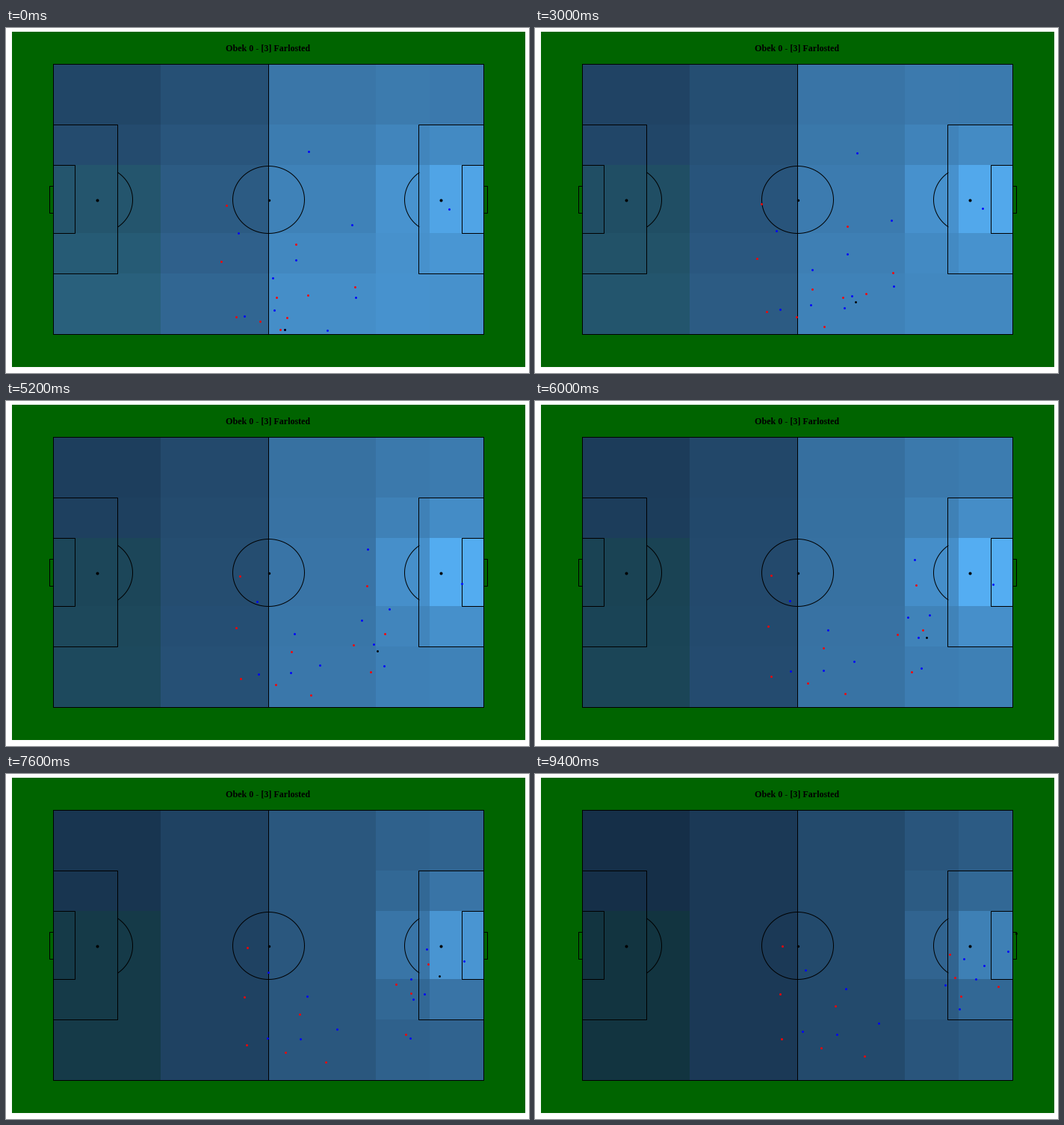
A matplotlib script that plays this animation: 700x461 px, repeating every 10 s.

```python
import numpy as np
import matplotlib.pyplot as plt
from matplotlib.animation import FuncAnimation
from matplotlib.patches import Rectangle

W, H, DPI = 700, 461, 64
FRAMES, STEP = 100, 100
END = 9.4   # seconds of play before the closing hold
TURN = 7.35  # the ball enters the last zone and all values drop
RAMP = 2.2  # seconds the players take to reach full pace

X_EDGES = [63, 207, 351, 495, 567, 639]
Y_EDGES = [48, 129, 183, 274, 328, 409]
LOW, HIGH = np.array([19, 43, 67]), np.array([86, 177, 247])
BOW, TEAL = np.array([1, 4, 5]), np.array([-3, 5, -8])

# Zone value per column: kick-off, before and after the turn, goal
START = np.array([.22, .30, .59, .62, .61])
BEFORE = np.array([.10, .20, .51, .60, .63])
AFTER = np.array([.09, .20, .37, .44, .45])
FINAL = np.array([.03, .12, .25, .34, .38])
ROWS = np.arange(5)
GOAL_PULL = np.outer(np.exp(-(ROWS - 2.0) ** 2), [0, 0, 0, .42, 1])

# Waypoints, evenly spaced over the run
BLUE = [
    [(310, 273), (361, 261)],
    [(356, 333), (415, 286)],
    [(358, 376), (403, 347)],
    [(318, 384), (357, 343)],
    [(404, 164), (448, 176), (528, 221), (632, 236)],
    [(592, 241), (602, 241), (613, 246), (600, 255)],
    [(462, 262), (488, 262), (540, 290), (589, 273)],
    [(387, 309), (438, 298), (516, 283), (573, 246)],
    [(467, 359), (488, 346), (525, 357), (567, 313)],
    [(372, 402), (450, 342), (527, 309), (548, 281)],
    [(429, 403), (413, 363), (432, 344), (459, 332)],
]
RED = [
    [(294, 236), (330, 229)],
    [(361, 359), (401, 309)],
    [(339, 391), (382, 365)],
    [(287, 311), (327, 293)],
    [(307, 385), (313, 370), (329, 353)],
    [(366, 402), (407, 392), (440, 376)],
    [(387, 288), (440, 255), (531, 246), (619, 283)],
    [(466, 345), (488, 319), (527, 300), (561, 271)],
    [(403, 356), (460, 357), (515, 358), (569, 296)],
    [(375, 386), (431, 346), (499, 299), (554, 240)],
]
BALL = [[(372, 402), (433, 363), (498, 332), (569, 278), (643, 212)]]


def pt(px):
    return px * 72 / DPI


def progress(t):
    """Share of the run covered: speeds up from rest, then steady."""
    run = t * t / (2 * RAMP) if t < RAMP else t - RAMP / 2
    return run / (END - RAMP / 2)


def make_path(points):
    """Polynomial curve through the waypoints."""
    n = len(points)
    coef = np.polyfit(np.linspace(0, 1, n), np.array(points, float), n - 1)
    return lambda p: p ** np.arange(n - 1, -1, -1.0) @ coef


def zone_colors(t):
    if t < TURN:
        f = t / TURN
        base = START + (BEFORE - START) * f * f
        lean, pull = .042 * (1 - f), .22 + .14 * f
    else:
        f = (t - TURN) / (END - TURN)
        base = AFTER + (FINAL - AFTER) * f
        lean, pull = 0, .38 - .10 * f
    v = (base + lean * ROWS[:, None] + pull * GOAL_PULL)[..., None]
    rgb = LOW + (HIGH - LOW) * v - BOW * 4 * v * (1 - v)
    rgb[2:, 0] += TEAL
    return np.clip(rgb, 0, 255) / 255


fig = plt.figure(figsize=(W / DPI, H / DPI), dpi=DPI, facecolor="white")
ax = fig.add_axes([0, 0, 1, 1])
ax.axis("off")
ax.add_patch(Rectangle((8, 5), 687, 448, color="#006400", lw=0))
zones = ax.pcolormesh(X_EDGES, Y_EDGES, zone_colors(0), zorder=2)
ax.set_xlim(0, W)
ax.set_ylim(H, 0)


def line(x, y):
    ax.plot(x, y, color="black", lw=pt(1), solid_capstyle="projecting",
            solid_joinstyle="miter", zorder=3)


def box(x0, y0, x1, y1):
    line([x0, x1, x1, x0, x0], [y0, y0, y1, y1, y0])


def arc(cx, start, stop):
    a = np.radians(np.linspace(start, stop, 90))
    line(cx + .5 + 48 * np.cos(a), 229.5 + 45 * np.sin(a))


def dots(x, y, size, color, z, **style):
    return ax.scatter(x, y, s=pt(size) ** 2, color=color, lw=0, zorder=z, **style)


box(63, 48, 639, 409)
line([351, 351], [48, 409])
for goal, side in ((63, 1), (639, -1)):
    for depth, top, bottom in ((87, 129, 328), (29, 183, 274), (-5, 211, 247)):
        box(goal, top, goal + side * depth - (depth == 87 and side == 1), bottom)
arc(351, 0, 360)
arc(121, -53.5, 53.5)
arc(581, 126.5, 233.5)
dots([121.5, 581.5], [229.5, 229.5], 4, "black", 3)
dots([351.5], [229.5], 3.4, "black", 3)

ax.text(351, 31, "Obek 0 - [3] Farlosted", family="Liberation Serif",
        weight="bold", size=pt(12), ha="center", va="baseline")

groups = []
for z, (color, routes) in enumerate((("red", RED), ("blue", BLUE), ("black", BALL)), 4):
    groups.append((dots([], [], 2.9, color, z), [make_path(r) for r in routes]))


def update(i):
    t = min(i * STEP / 1000, END)
    zones.set_array(zone_colors(t))
    for marks, paths in groups:
        marks.set_offsets(np.round([path(progress(t)) for path in paths]) + .5)
    return [zones] + [marks for marks, _ in groups]


anim = FuncAnimation(fig, update, frames=FRAMES, interval=STEP,
                     repeat=True, repeat_delay=0, blit=False)
plt.show()
```
